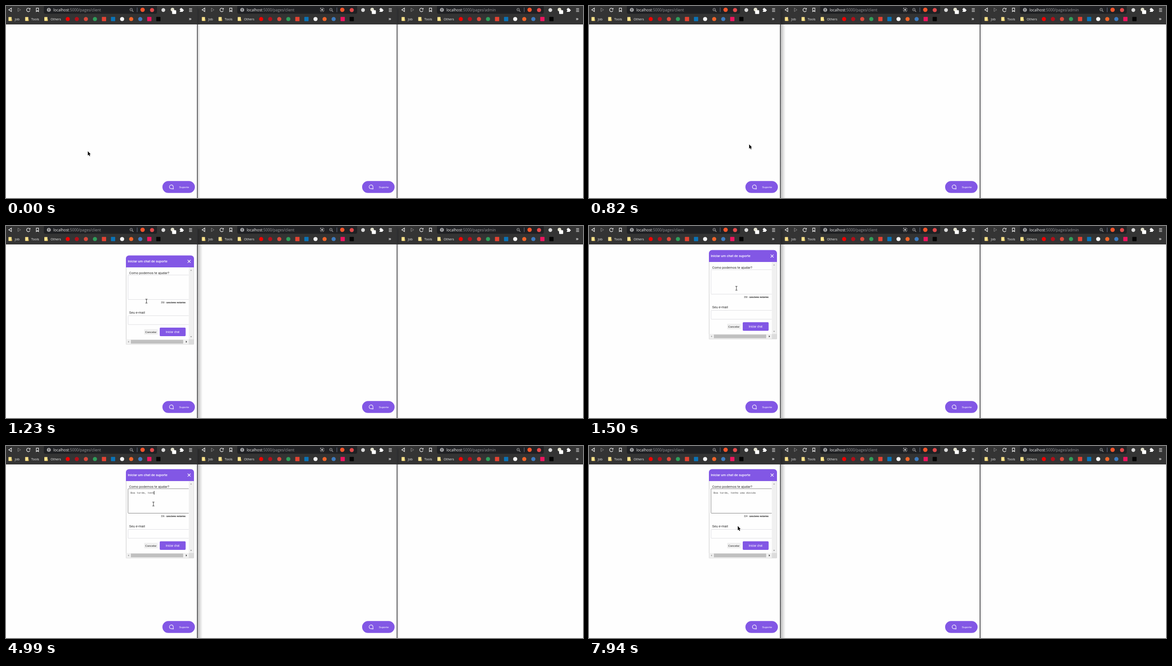
An HTML page with a canvas that plays this animation: 1280x427 px, repeating every 8 s.

```html
<!DOCTYPE html>
<html lang="pt">
<head>
<meta charset="utf-8">
<title>Chat de suporte</title>
<style>
  html, body { margin: 0; width: 100%; height: 100%; overflow: hidden; background: #fefefe; }
  canvas { display: block; }
</style>
</head>
<body>
<canvas id="stage" width="1280" height="427"></canvas>
<script>
const ctx = document.getElementById('stage').getContext('2d');
const LOOP = 8000;
const PURPLE = '#8257e5';
const UI = '"Open Sans", "Noto Sans", sans-serif';
const ROBOTO = 'Roboto, sans-serif';
const ARIAL = '"Liberation Sans", sans-serif';
const MONO = '"Liberation Mono", monospace';

// left: shift of navigation and bookmarks, right: shift of the right-aligned items
const windows = [
  { x: 0, end: 424, left: 0, right: 0, bar: [84, 335], page: 'client', button: 0 },
  { x: 425, end: 867, left: 429, right: 443, bar: [513, 779], page: 'client', button: 443, scan: true },
  { x: 868, end: 1280, left: 872, right: 858.5, bar: [956, 1193], page: 'admin' },
];

const bookmarks = [
  ['#f00000'], ['#b0101a'], ['#d9483b'], ['#2f9e5b'], ['#e44332', 1], ['#0a74b8', 1],
  ['#f4f4f4'], ['#f0652a'], ['#3d7cc0'], ['#ee1560', 1], ['#050505', 1],
];

const message = 'Boa tarde, tenho uma dúvida';
const keyTimes = [2520, 2790, 2850, 2990, 3190, 3260, 3330, 3390, 3530, 4260, 4390, 4590, 4660, 4790,
  4990, 5190, 5320, 5520, 5720, 5850, 6130, 6130, 6660, 6730, 6930, 7000, 7060];
const FOCUS = 1780, ACCENT = 6380, BLINK = 530;

const pointerPath = [
  [70, 181.5, 323], [600, 410, 408], [700, 410, 408], [950, 295, 197.5],
  [1500, 327, 138.5], [1640, 327, 129], [7590, 327, 129], [7940, 330, 178],
];

function rect(x, y, w, h, color, radius = 0) {
  ctx.fillStyle = color;
  ctx.beginPath();
  ctx.roundRect(x, y, w, h, radius);
  ctx.fill();
}

function frame(x, y, w, h, color, radius = 0) {
  ctx.strokeStyle = color;
  ctx.lineWidth = 1;
  ctx.beginPath();
  ctx.roundRect(x, y, w, h, radius);
  ctx.stroke();
}

function dot(x, y, r, color) {
  ctx.fillStyle = color;
  ctx.beginPath();
  ctx.arc(x, y, r, 0, Math.PI * 2);
  ctx.fill();
}

function trace(points, closed) {
  ctx.beginPath();
  points.forEach(([x, y]) => ctx.lineTo(x, y));
  if (closed) ctx.closePath();
}

function line(points, color, width = 1, closed = false) {
  trace(points, closed);
  ctx.strokeStyle = color;
  ctx.lineWidth = width;
  ctx.stroke();
}

function fill(points, color) {
  trace(points, true);
  ctx.fillStyle = color;
  ctx.fill();
}

function arc(x, y, r, from, to, color, width = 1) {
  ctx.strokeStyle = color;
  ctx.lineWidth = width;
  ctx.beginPath();
  ctx.arc(x, y, r, from, to);
  ctx.stroke();
}

function text(str, x, y, size, family, color, weight = 400) {
  ctx.font = `${weight} ${size}px ${family}`;
  ctx.fillStyle = color;
  ctx.fillText(str, x, y);
  return ctx.measureText(str).width;
}

function at(x, y, draw) {
  ctx.save();
  ctx.translate(x, y);
  draw();
  ctx.restore();
}

function drawNavigation() {
  line([[6, 8.5], [12, 4.7], [12, 12.3]], '#f2f2f2', 1.2, true);
  line([[32.5, 8.5], [26.5, 4.7], [26.5, 12.3]], '#858585', 1, true);
  arc(49.5, 8.7, 3.8, 0.3, 5.3, '#f2f2f2', 1.3);
  fill([[50.5, 7.8], [54, 7.8], [54, 4]], '#f2f2f2');
  line([[67.2, 4.7], [72.2, 4.7], [72.2, 12.5], [69.7, 10.2], [67.2, 12.5]], '#f2f2f2', 1.2, true);
}

function drawBookmarks() {
  [['Job', 5.5, 19.5], ['Tools', 42.5, 56], ['Others', 85, 99]].forEach(([label, icon, x]) => {
    rect(icon, 24.5, 7, 8.8, '#fbe28a', 0.8);
    fill([[icon + 5, 33.3], [icon + 8, 33.3], [icon + 8, 29]], '#d9b24c');
    text(label, x, 31.7, 7.2, UI, '#f4f4f4');
  });
  bookmarks.forEach(([color, square], i) => {
    const x = 137 + i * 20.1;
    if (square) rect(x - 4.7, 24.3, 9.4, 9.4, color, 1);
    else dot(x, 29, 4.6, color);
  });
}

function drawToolbarRight() {
  arc(277.7, 8, 2.9, 0, 7, '#a8a8a8');
  line([[279.9, 10.2], [282.6, 12.8]], '#a8a8a8', 1.2);
  line([[276.3, 8], [279.1, 8]], '#a8a8a8', 0.8);
  rect(290.5, 3.5, 1, 10, '#6d7891');
  dot(303, 8.5, 4.8, '#f4552b');
  dot(324, 9, 4.6, '#e04a4a');
  dot(349, 9, 4.2, '#d8d8d8');
  dot(369.3, 8, 4, '#e4e2cf');
  rect(368.5, 9.3, 9, 8.5, '#fff', 1.5);
  rect(385.5, 6, 7, 7, '#fff', 0.8);
  dot(388.7, 5.8, 1.6, '#fff');
  dot(392.8, 9.5, 1.6, '#fff');
  dot(385.7, 9.7, 1.2, '#343434');
  [5.2, 8.4, 11.6].forEach(y => rect(406.2, y, 6.6, 1.2, '#f2f2f2'));
  text('»', 405.6, 32.4, 11, UI, '#f2f2f2', 600);
}

function drawScanIcon() {
  const color = '#c4c4c4';
  ctx.setLineDash([2.4, 1.6]);
  frame(697.5, 4.7, 7.6, 7.6, color);
  ctx.setLineDash([]);
  rect(699.5, 6.7, 3.6, 3.6, color);
}

function drawAddress({ bar: [start, end], page }) {
  rect(start, -4, end - start, 21.3, '#1f2023', 4);
  dot(start + 11, 8.7, 4.4, '#a4a5a7');
  rect(start + 10.4, 6, 1.2, 3.4, '#1f2023');
  rect(start + 10.4, 10.2, 1.2, 1.2, '#1f2023');
  const w = text('localhost', start + 21, 11.9, 8.3, UI, '#f5f5f5');
  text(':5000/pages/' + page, start + 21 + w, 11.9, 8.3, UI, '#96979a');
}

function drawSupportButton(hover) {
  rect(347, 389.3, 72, 26.5, hover ? '#9168e8' : PURPLE, 13.2);
  arc(366.8, 402.2, 4.3, 1.1, 6.6, '#fff', 1.1);
  line([[371, 403.2], [371.4, 406.9], [367.2, 406.4]], '#fff', 1.1);
  text('Suporte', 384, 404.5, 6.25, ARIAL, '#fff');
}

function drawShadow(x, width, alpha) {
  const g = ctx.createLinearGradient(x, 0, x + width, 0);
  g.addColorStop(0, `rgba(0,0,0,${alpha})`);
  g.addColorStop(1, 'rgba(0,0,0,0)');
  ctx.fillStyle = g;
  ctx.fillRect(x, 7, width, 420);
}

function drawWindow(win, t) {
  rect(win.x, 0, win.end - win.x, 41, '#343434');
  drawAddress(win);
  at(win.left, 0, () => { drawNavigation(); drawBookmarks(); });
  at(win.right, 0, drawToolbarRight);
  if (win.scan) drawScanIcon();
  if (win.button !== undefined) {
    at(win.button, 0, () => drawSupportButton(win.x === 0 && t > 540 && t < 760));
  }
}

function drawScrollbars() {
  rect(405.5, 27, 11, 159.5, '#f0f0f0');
  rect(266.5, 186.5, 139, 11, '#f0f0f0');
  rect(405.5, 186.5, 11, 11, '#dcdcdc');
  rect(277, 187.8, 116, 8.2, '#c0c0c0');
  fill([[408.6, 34], [412.6, 34], [410.6, 31.6]], '#a0a0a0');
  fill([[408.6, 179.8], [412.6, 179.8], [410.6, 182.2]], '#909090');
  fill([[272.8, 189.8], [272.8, 194], [270.3, 191.9]], '#a0a0a0');
  fill([[399, 189.6], [399, 194.2], [401.6, 191.9]], '#404040');
}

function drawTyping(t) {
  const typed = keyTimes.filter(k => k <= t).length;
  const left = 250 - Math.max(0, typed - 1) - (t >= ACCENT && typed === 22 ? 1 : 0);
  text(String(left), 343.7, 106.2, 4.75, ROBOTO, '#222');
  text(message.slice(0, typed), 276.2, 54.4, 5.78, MONO, '#484848');
  const last = typed ? keyTimes[typed - 1] : FOCUS - 60;
  if (t >= FOCUS && Math.floor((t - last) / BLINK) % 2 === 0) {
    rect(276.1 + typed * 3.468, 48.5, 0.9, 8, '#000');
  }
}

function drawPopup(t) {
  rect(266, 0, 151, 198, '#fefefe', [7, 7, 0, 0]);
  frame(266.5, 20.5, 150, 177, '#c9c9c9');
  rect(266, 0, 151, 26.5, PURPLE, [7, 7, 0, 0]);
  text('Iniciar um chat de suporte', 270.2, 15.6, 7.52, ROBOTO, '#fff', 500);
  line([[403, 10], [409.4, 16.4]], '#fff', 1.2);
  line([[409.4, 10], [403, 16.4]], '#fff', 1.2);

  ctx.save();
  ctx.beginPath();
  ctx.rect(267, 27, 138.5, 159);
  ctx.clip();
  text('Como podemos te ajudar?', 273.2, 41.8, 7.6, ROBOTO, '#2c2c2c');
  frame(270.7, 43.5, 150, 54.5, t >= FOCUS ? '#858585' : '#dedee2', 1);
  text('caracteres restantes', 355.3, 106.2, 4.7, ROBOTO, '#111', 500);
  text('Seu e-mail', 273.2, 129.2, 7.6, ROBOTO, '#2c2c2c');
  frame(270.7, 134, 150, 19.7, '#dedee2', 1);
  rect(306.5, 164, 30, 12, '#efefef', 1);
  text('Cancelar', 308.8, 172.2, 6.25, ARIAL, '#222');
  rect(341, 160.5, 57.5, 19, PURPLE, 2);
  text('Iniciar chat', 354.2, 172.2, 6.35, ARIAL, '#fff');
  drawTyping(t);
  ctx.restore();
  drawScrollbars();
}

function pointerAt(t) {
  const next = pointerPath.findIndex(p => p[0] > t);
  if (next === 0) return pointerPath[0].slice(1);
  if (next < 0) return pointerPath[pointerPath.length - 1].slice(1);
  const [t0, x0, y0] = pointerPath[next - 1], [t1, x1, y1] = pointerPath[next];
  const u = (t - t0) / (t1 - t0), e = u * u * (3 - 2 * u);
  return [x0 + (x1 - x0) * e, y0 + (y1 - y0) * e];
}

function drawPointer(t) {
  const [x, y] = pointerAt(t);
  const overTextArea = t > 915 && y < 198 && !(t > 7590 && y > 149);
  at(x, y, () => {
    if (overTextArea) {
      line([[-2.3, -4.3], [2.3, -4.3]], '#222', 0.9);
      line([[-2.3, 4.3], [2.3, 4.3]], '#222', 0.9);
      line([[0, -4.3], [0, 4.3]], '#222', 0.9);
    } else {
      const arrow = [[0, 0], [0, 9.4], [2.1, 7.5], [3.7, 11], [5.2, 10.3], [3.7, 6.9], [6.3, 6.7]];
      line(arrow, '#fff', 0.8, true);
      fill(arrow, '#000');
    }
  });
}

function draw(t) {
  rect(0, 0, 1280, 427, '#fefefe');
  windows.forEach(win => drawWindow(win, t));
  const focused = t >= 600;
  drawShadow(425, focused ? 11 : 6, focused ? 0.26 : 0.16);
  drawShadow(868, 5, 0.14);
  rect(423.7, 0, 1.5, 427, '#303134');
  rect(866.7, 0, 1.5, 427, '#303134');
  if (t >= 880) {
    const slide = t < 1640 ? 163 * Math.exp(-(t - 880) / 143) : 0;
    at(0, 51.5 + slide, () => drawPopup(t));
  }
  drawPointer(t);
}

const start = performance.now();
function tick() {
  draw((performance.now() - start) % LOOP);
  requestAnimationFrame(tick);
}
tick();
</script>
</body>
</html>
```
